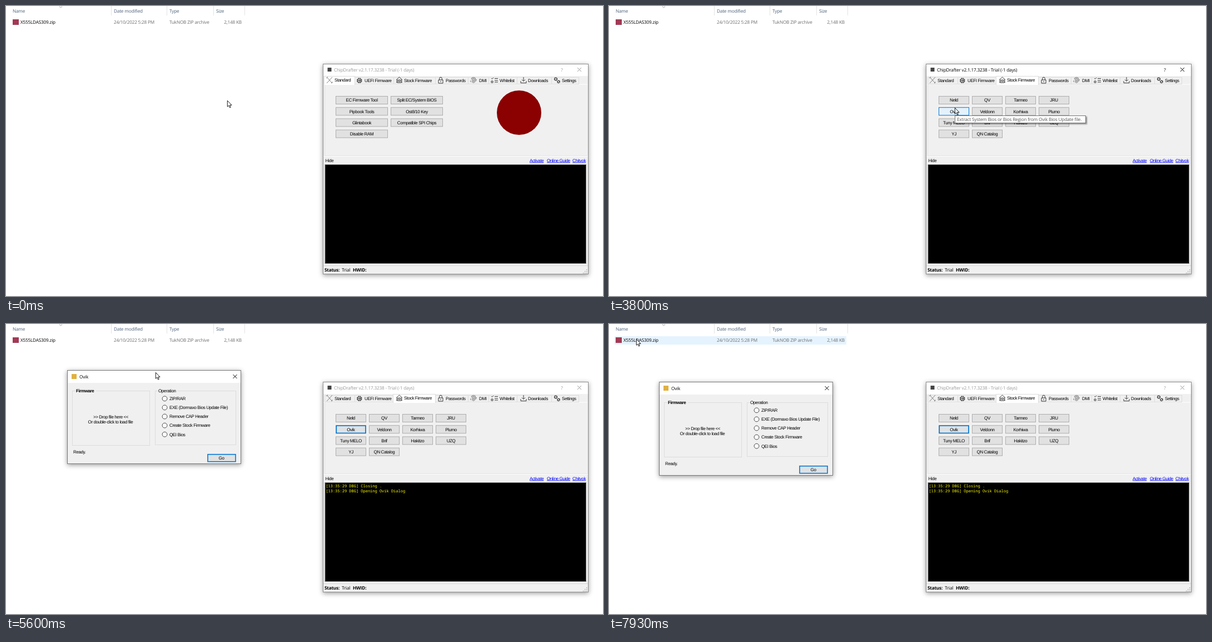
Animation of 1074x522 px, one loop 8000 ms. Source, as an HTML page:

```html
<!DOCTYPE html>
<html lang="en">
<head>
<meta charset="utf-8">
<title>Firmware tool walkthrough</title>
<style>
html, body { margin: 0; width: 100%; height: 100%; overflow: hidden; background: #fff; }
svg { display: block; width: 1074px; height: 522px; }
text { font: 8px "Liberation Sans", Arial, sans-serif; letter-spacing: -.4px; text-rendering: geometricPrecision; white-space: pre; }
.ui { font: 8.2px "Open Sans", sans-serif; letter-spacing: -.18px; }
.log { font: 7px "Noto Sans Mono", monospace; letter-spacing: 0; fill: #ff0; }
.b { font-weight: 700; }
.head { fill: #4c607a; }
.dim { fill: #6d6d6d; }
.mid { text-anchor: middle; }
.end { text-anchor: end; }
.link { fill: #00f; text-decoration: underline; }
.line { fill: none; stroke: #222; stroke-width: .9; }
.btn { fill: #e1e1e1; stroke: #adadad; }
.group { fill: none; stroke: #dcdcdc; }
.shadow { filter: drop-shadow(0 2px 4px #0006); }

/* Steps fall on a 15 per second grid; the delay absorbs rounding. */
.title, .cross, .first, .second, .pick, .focus, .tip, .entry, .dialog, .row, #cursor {
  animation: 8s step-end -4ms infinite;
}
.title { animation-name: title; }
.cross { animation-name: cross; fill: none; }
.first { animation-name: first; }
.second { animation-name: second; }
.pick { animation-name: pick; }
.focus { animation-name: focus; fill: none; stroke: #0078d7; stroke-width: 1.6; }
.tip { animation-name: tip; }
.entry { animation-name: entry; }
.dialog { animation-name: fade, drag; }
.row { animation-name: row; }
#cursor { animation-name: cursor; }

@keyframes title { 0%, 55.833%, 100% { fill: #999; } 19.167% { fill: #000; } }
@keyframes cross { 0%, 55.833%, 100% { stroke: #999; } 19.167% { stroke: #000; } }
@keyframes first { 0% { visibility: visible; } 19.167%, 100% { visibility: hidden; } }
@keyframes second { 0% { visibility: hidden; } 19.167%, 100% { visibility: visible; } }
@keyframes pick {
  0%, 60%, 100% { fill: #e1e1e1; stroke: #adadad; }
  38.333%, 55% { fill: #e5f1fb; stroke: #0078d7; }
  53.333% { fill: #cce4f7; stroke: #005499; }
}
@keyframes focus { 0% { opacity: 0; } 60%, 100% { opacity: 1; } }
@keyframes entry { 0% { opacity: 0; } 56.667%, 100% { opacity: 1; } }
@keyframes row { 0% { opacity: 0; } 80.833%, 100% { opacity: 1; } }
@keyframes tip {
  0%, 54.167%, 100% { opacity: 0; }
  44.167% { opacity: 0; animation-timing-function: steps(4); }
  47.5% { opacity: 1; }
  52.5% { opacity: 1; animation-timing-function: steps(2); }
}
@keyframes fade {
  0% { opacity: 0; }
  55.833% { opacity: 0; animation-timing-function: steps(4); }
  59.167%, 100% { opacity: 1; }
}
@keyframes drag {
  0% { transform: none; }
  70% { transform: translate(0, 0); animation-timing-function: steps(3); }
  72.5%, 100% { transform: translate(-20px, 21px); }
}
@keyframes cursor {
  0% { transform: translate(398px, 170px); }
  5% { transform: translate(398px, 170px); animation-timing-function: steps(8); }
  11.667% { transform: translate(700px, 100px); animation-timing-function: steps(2); }
  13.333% { transform: translate(762px, 97px); animation-timing-function: steps(2); }
  15% { transform: translate(734px, 128px); }
  20.833% { transform: translate(734px, 129px); }
  33.333% { transform: translate(733px, 130px); animation-timing-function: steps(7); }
  39.167% { transform: translate(622px, 183px); }
  59.167% { transform: translate(622px, 183px); animation-timing-function: steps(8); }
  65.833% { transform: translate(285px, 86px); animation-timing-function: steps(3); }
  68.333% { transform: translate(269px, 87px); }
  70% { transform: translate(269px, 87px); animation-timing-function: steps(3); }
  72.5% { transform: translate(249px, 106px); }
  74.167% { transform: translate(249px, 106px); animation-timing-function: steps(6); }
  79.167% { transform: translate(64.5px, 39px); animation-timing-function: steps(7); }
  85% { transform: translate(175px, 23px); animation-timing-function: steps(2); }
  86.667% { transform: translate(168px, 23px); }
  90.833% { transform: translate(168px, 23px); animation-timing-function: steps(10); }
  99.167%, 100% { transform: translate(49px, 27px); }
}
</style>
</head>
<body>
<svg id="stage" viewBox="0 0 1074 522"></svg>
<script>
const text = (x, y, s, cls = '') => `<text x="${x}" y="${y}" class="${cls}">${s}</text>`;
const rect = (x, y, w, h, attrs) => `<rect x="${x}" y="${y}" width="${w}" height="${h}" ${attrs}/>`;
const path = (d, attrs = 'class="line"') => `<path d="${d}" ${attrs}/>`;
const group = (cls, ...parts) => `<g class="${cls}">${parts.join('')}</g>`;
const button = (x, y, w, label, cls = '') =>
  rect(x + .5, y + .5, w - 1, 14, `class="btn ${cls}"`) + text(x + w / 2, y + 10.4, label, 'mid');
const grid = (labels, cols, x, w, step) => labels.map((label, i) =>
  button(x + i % cols * step, 162 + Math.floor(i / cols) * 20.2, w, label, label === 'Ovik' ? 'pick' : '')).join('');

function explorer() {
  const seps = [189, 289, 373, 429].map(x => `M${x}.5 0V17`).join('');
  return group('row', rect(10, 22, 417, 15, 'fill="#e5f3ff"'))
    + path(seps, 'stroke="#e3e3e3"')
    + path('M96 .8L98.5 3L101 .8', 'fill="none" stroke="#888" stroke-width=".8"')
    + text(12, 12, 'Name', 'ui head') + text(194, 12, 'Date modified', 'ui head')
    + text(294, 12, 'Type', 'ui head') + text(378, 12, 'Size', 'ui head')
    + rect(12, 24, 11, 10, 'fill="#a23a55"')
    + text(26, 32, 'X555LDAS309.zip', 'ui') + text(194, 32, '24/10/2022 5:28 PM', 'ui dim')
    + text(294, 32, 'TukNOB ZIP archive', 'ui dim') + text(424, 32, '2,148 KB', 'ui dim end');
}

const tabs = [
  [573, 591, 'Standard'], [627, 645, 'UEFI Firmware'], [697, 716, 'Stock Firmware'], [772, 791, 'Passwords'],
  [831, 851, 'DMI'], [868, 888, 'Whitelist'], [919, 939, 'Downloads'], [981, 1000, 'Settings'], [1030]
];

function tab(i, selected) {
  const [x, tx, label] = tabs[i], w = tabs[i + 1][0] - x;
  return selected
    ? rect(x - .5, 126.5, w + 1, 15, 'fill="#fff" stroke="#dcdcdc"') + rect(x, 140, w, 2, 'fill="#fff"') + text(tx, 136.4, label)
    : rect(x + .5, 128.5, w, 12, 'fill="#f0f0f0" stroke="#dcdcdc"') + text(tx, 137.4, label);
}

function icons() {
  return path('M577 128L587 139M587 128L577 139M576 130L579 127.5M585 139L588 136.5', 'class="line" style="stroke:#777"')
    + path('M633 131H638.5V137.5H633ZM631 132.5H633M631 134.3H633M631 136H633M638.5 132.5H640.5M638.5 134.3H640.5M638.5 136H640.5M634.5 129.3V131M637 129.3V131M634.5 137.5V139M637 137.5V139M635 133H637V135.5H635Z')
    + path('M702 133L707.5 128L713 133M704 132V138H711V132M706 133H709V136H706ZM702 135H704M702 137.5H704M711 135H713M711 137.5H713')
    + path('M778 133H786V139H778ZM779.7 133V130.5Q779.7 128.2 782 128.2Q784.3 128.2 784.3 130.5V133M782 135V137')
    + path('M837 132Q837 128.5 841 128.5Q845 128.5 845 132V136M839 138V132Q839 130.3 841 130.3Q843 130.3 843 132V138M841 132V139M836 134V137M846 132V134', 'class="line" style="stroke:#666"')
    + path('M873 130L874.5 131.5L877 129M873 135H876V138H873ZM879 130.5H885M879 134H885M879 137H885')
    + path('M931 128V135M928 132.5L931 135.5L934 132.5M926 135V138.5H936V135')
    + '<g class="line" stroke-dasharray="1.4 .5" style="stroke-width:1.8"><circle cx="989" cy="131.5" r="2.3"/><circle cx="994" cy="136.3" r="2"/></g>';
}

function mainWindow() {
  let grip = '';
  for (let i = 0; i < 3; i++)
    for (let j = 0; j <= i; j++) grip += rect(1044 - 3 * j, 474 + 3 * i - 0, 1.3, 1.3, 'fill="#999"');

  const standard = group('first', tab(0, true), tab(2),
    grid(['EC Firmware Tool', 'Split EC/System BIOS', 'Pipbook Tools', 'Ost8/10 Key',
      'Glintabook', 'Compatible SPI Chips', 'Disable RAM'], 2, 593, 94, 99),
    '<circle cx="923" cy="192" r="40" fill="#8b0000"/>');
  const stock = group('second', tab(0), tab(2, true),
    grid(['Neld', 'QV', 'Tarmeo', 'JRU', 'Ovik', 'Veldonn', 'Korhiwa', 'Plumo',
      'Tuny MELO', 'Brif', 'Hakitzo', 'UZQ', 'YJ', 'QN Catalog'], 4, 593, 55, 60),
    rect(594.3, 183, 52.6, 13.4, 'class="focus"'));

  return rect(570.5, 104.5, 477, 378, 'fill="#f0f0f0" stroke="#8c8c8c" class="shadow"')
    + rect(571, 105, 476, 21, 'fill="#fff"')
    + rect(578.5, 111, 7, 7, 'fill="#444"')
    + text(590, 118, 'ChipDrafter v2.1.17.3238 - Trial (-1 days)', 'ui title')
    + text(1000, 118.3, '?', 'ui mid title')
    + path('M1028 111L1035 118M1035 111L1028 118', 'class="cross"')
    + path('M571 141H1046M571 270.5H1047', 'stroke="#fff" fill="none"')
    + path('M573.5 141V269M573 269.5H1046', 'stroke="#e2e2e2" fill="none"')
    + [1, 3, 4, 5, 6, 7].map(i => tab(i)).join('')
    + standard + stock + icons()
    + text(574.5, 280.5, 'Hide')
    + text(942, 280.5, 'Activate', 'link') + text(973, 280.5, 'Online Guide', 'link') + text(1043, 280.5, 'Chitvok', 'link end')
    + rect(574, 285.5, 469.5, 178, 'fill="#000" stroke="#808080"')
    + group('entry', text(575.3, 294, '[13:35:29 DBG] Closing .', 'log'),
      text(575.3, 303, '[13:35:29 DBG] Opening Ovik Dialog', 'log'))
    + path('M571 467.5H1047', 'stroke="#d7d7d7"')
    + text(573, 478, 'Status:', 'ui b') + text(604, 478, 'Trial', 'ui') + text(624, 478, 'HWID:', 'ui b')
    + grip;
}

function dialog() {
  const radios = ['ZIP/RAR', 'EXE (Dormaxo Bios Update File)', 'Remove CAP Header', 'Create Stock Firmware', 'QEI Bios']
    .map((label, i) => {
      const y = 134.3 + i * 16.1;
      return `<circle cx="285.5" cy="${y}" r="4.4" fill="#fff" stroke="#333" stroke-width=".9"/>` + text(294, y + 2.8, label);
    }).join('');
  return group('dialog',
    rect(110.5, 83.5, 312, 168, 'fill="#f0f0f0" stroke="#777" class="shadow"'),
    rect(111, 84, 311, 22, 'fill="#fff"'),
    rect(118, 90, 9, 9, 'fill="#e0b040"'),
    text(132, 98, 'Ovik', 'ui'),
    path('M408.5 91L415.5 98M415.5 91L408.5 98', 'stroke="#000"'),
    rect(119.5, 120.5, 139, 98, 'class="group"'),
    rect(268.5, 120.5, 145, 97, 'class="group"'),
    rect(125, 117, 37, 7, 'fill="#f0f0f0"'), rect(273, 117, 35, 7, 'fill="#f0f0f0"'),
    text(126, 123, 'Firmware', 'b'), text(274, 123, 'Operation'), radios,
    text(188.5, 170.3, '&gt;&gt; Drop file here &lt;&lt;', 'mid'),
    text(188, 179.3, 'Or double-click to load file', 'mid'),
    text(121, 233, 'Ready.'),
    rect(363, 234.7, 50, 13, 'fill="#e1e1e1" stroke="#0078d7" stroke-width="1.6"'),
    text(387.5, 244, 'Go', 'mid'));
}

const tip = group('tip',
  rect(622.5, 197.5, 235, 13, 'fill="#fff" stroke="#767676" style="filter:drop-shadow(2px 2px 1px #0006)"'),
  text(626, 207, 'Extract System Bios or Bios Region from Ovik Bios Update file.', 'ui" fill="#575757'));

const cursor = '<g id="cursor">'
  + path('M.3 .3V11.3L2.8 9L4.5 13L6.3 12.2L4.6 8.4H8Z', 'fill="#fff" stroke="#000" stroke-width=".9"') + '</g>';

document.getElementById('stage').innerHTML = explorer() + mainWindow() + dialog() + tip + cursor;
</script>
</body>
</html>
```
